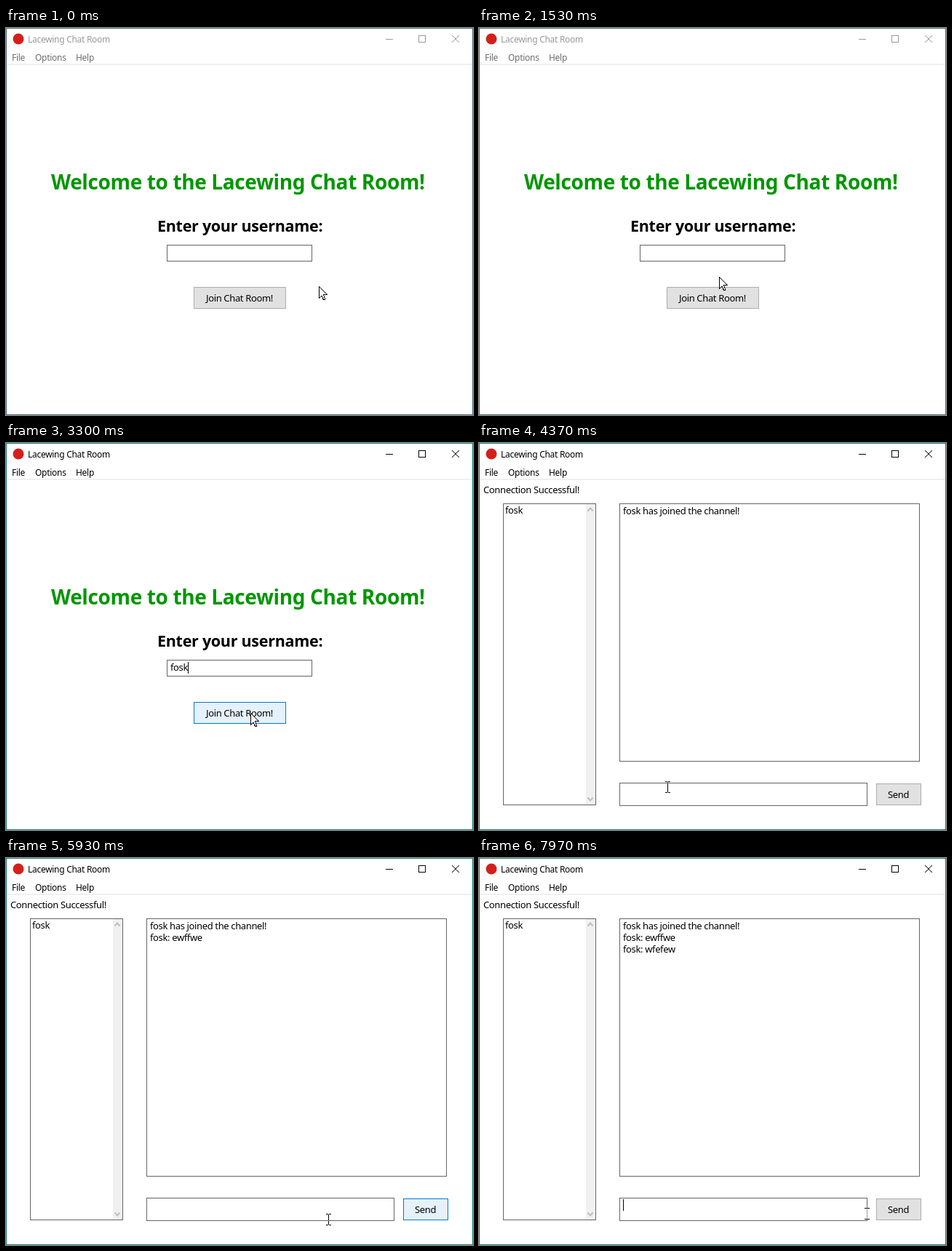
An HTML page that plays this animation: 642x532 px, repeating every 8000 ms.

```html
<!DOCTYPE html>
<html lang="en">
<head>
<meta charset="utf-8">
<title>Chat room</title>
<style>
html, body { margin: 0; width: 100%; height: 100%; overflow: hidden; background: #fff; }
svg { display: block; width: 642px; height: 532px; }
text { font: 13px "Noto Sans", "Open Sans", sans-serif; letter-spacing: -.028em; white-space: pre; }
.bar text { font-size: 12px; letter-spacing: -.024em; }
.title, .label { font-weight: 700; letter-spacing: -.013em; }
.title { font-size: 28px; fill: #009600; }
.label { font-size: 21.5px; }
.box { fill: #fff; stroke: #646464; }
.line { fill: none; }
#beam { mix-blend-mode: difference; }
</style>
</head>
<body>
<svg viewBox="0 0 642 532" shape-rendering="crispEdges">
  <rect width="642" height="532" fill="#fff"/>
  <rect y="49" width="642" height="2" fill="#f0f0f0"/>
  <circle cx="17" cy="15" r="7.5" fill="#d4201a" shape-rendering="auto"/>
  <g class="bar">
    <text id="caption" x="30" y="20">Lacewing Chat Room</text>
    <g id="menu">
      <text x="8" y="45">File</text>
      <text x="40" y="45">Options</text>
      <text x="96" y="45">Help</text>
    </g>
  </g>
  <g id="controls" class="line">
    <path d="M522 15.5h10M567.5 10.5h9v9h-9z"/>
    <path d="M613 10l10 10M623 10l-10 10" shape-rendering="auto"/>
  </g>

  <g id="login">
    <text class="title" x="62" y="222">Welcome to the Lacewing Chat Room!</text>
    <text class="label" x="208" y="280">Enter your username:</text>
    <rect class="box" x="221.5" y="298.5" width="199" height="22"/>
    <text id="nameText" x="226" y="313"></text>
    <rect id="joinBtn" x="258.5" y="356.5" width="126" height="29"/>
    <text x="275" y="376">Join Chat Room!</text>
  </g>

  <g id="chat">
    <text x="6" y="69">Connection Successful!</text>
    <rect class="box" x="33.5" y="83.5" width="127" height="414"/>
    <rect x="147" y="84" width="13" height="413" fill="#f0f0f0"/>
    <path class="line" stroke="#bfbfbf" stroke-width="2" shape-rendering="auto"
      d="M149.5 93.5l3.5-4 3.5 4M149.5 487.5l3.5 4 3.5-4"/>
    <text id="member" x="36" y="97"></text>
    <rect class="box" x="193.5" y="83.5" width="412" height="354"/>
    <text id="log0" x="198" y="98"></text>
    <text id="log1" x="198" y="114"></text>
    <text id="log2" x="198" y="130"></text>
    <rect class="box" x="193.5" y="467.5" width="340" height="31"/>
    <text id="draft" x="198" y="482"></text>
    <rect id="sendBtn" x="546.5" y="468.5" width="61" height="29"/>
    <text x="562" y="488">Send</text>
  </g>

  <rect id="caret" width="1" height="16"/>
  <path id="frame" class="line" d="M.5 .5h641v531h-641z"/>
  <path id="arrow" fill="#fff" stroke="#000"
    d="M.5 .5V16.5L4 13 6.5 18.5H8L8.5 17 6.5 11.5H11.5Z"/>
  <path id="beam" fill="#fff" d="M-3-8h3v1h1v-1h3v1h-3v14h3v1h-3v-1h-1v1h-3v-1h3v-14h-3z"/>
</svg>
<script>
const LOOP = 8000, USER = 'fosk', BLINK = 530, KEY = 33, FADE = 90;
const $ = id => document.getElementById(id);

// each visit to a text field: click, type, press the button, text leaves
const visits = [
  { focus: 1600, type: 2970, word: USER, press: 3330, send: 3770 },
  { focus: 4600, type: 4830, word: 'ewffwe', press: 5430, send: 5540 },
  { focus: 5950, type: 6230, word: 'wfefew', press: 6700, send: 6800 },
  { focus: 7130, type: 7450, word: '', press: LOOP, send: LOOP }
];

// pointer moves: start, end, x, y
const moves = [
  [0, 0, 430, 355], [230, 560, 405, 47], [560, 1000, 340, 375],
  [1070, 1530, 330, 342], [1530, 1600, 338, 308], [2270, 2800, 338, 384],
  [3270, 3300, 336, 371], [3770, 4370, 259, 473], [4370, 4670, 319, 489],
  [5050, 5400, 585, 485], [5670, 5930, 443, 497], [6430, 6680, 577, 485],
  [6900, 7000, 533, 489], [7400, 7670, 8, 46], [7670, 7940, 533, 489]
];

const fills = [[225, 225, 225], [229, 241, 251], [204, 228, 247]];
const edges = [[173, 173, 173], [0, 120, 215], [0, 84, 153]];

const ease = k => k * k * (3 - 2 * k);
const mix = (a, b, k) => a.map((v, i) => v + (b[i] - v) * k);
const show = (el, on) => el.setAttribute('visibility', on ? 'visible' : 'hidden');
const lastIndex = (list, test) => list.reduce((n, v, i) => test(v) ? i : n, -1);
const inChat = t => t >= visits[0].send;

function pointer(t) {
  const i = lastIndex(moves, m => m[0] <= t);
  const [start, end, ...to] = moves[i];
  if (t >= end) return to;
  return mix(moves[i - 1].slice(2), to, ease((t - start) / (end - start)));
}

function over(id, [x, y]) {
  const b = $(id), [l, t, w, h] = ['x', 'y', 'width', 'height'].map(k => +b.getAttribute(k));
  return x >= l && x <= l + w && y >= t && y <= t + h;
}

// 0 at rest, 1 hovered or holding the focus, 2 pressed
function buttonState(id, t) {
  const v = visits[lastIndex(visits, v => v.focus <= t)];
  const mine = v && (v === visits[0]) === (id === 'joinBtn');
  if (mine && t >= v.press) return t < v.send ? 2 : 1;
  return over(id, pointer(t)) ? 1 : 0;
}

function paint(id, t) {
  const n = 6;
  let level = 0;
  for (let i = 0; i < n; i++) level += buttonState(id, Math.max(0, t - i * FADE / n)) / n;
  const i = Math.min(1, Math.floor(level));
  const shade = set => `rgb(${mix(set[i], set[i + 1], level - i).map(Math.round)})`;
  $(id).setAttribute('fill', shade(fills));
  $(id).setAttribute('stroke', shade(edges));
}

function typed(v, t) {
  if (!v || t >= v.send) return '';
  return v.word.slice(0, Math.max(0, Math.floor((t - v.type) / KEY) + 1));
}

function drawField(v, t) {
  const chat = inChat(t), field = $(chat ? 'draft' : 'nameText');
  const text = typed(v, t);
  if (field.textContent !== text) field.textContent = text;
  const width = text ? field.getComputedTextLength() : 0;
  const caret = $('caret');
  caret.setAttribute('x', Math.round(+field.getAttribute('x') + width));
  caret.setAttribute('y', chat ? 469 : 301);
  const idle = v ? t - (t >= v.type ? v.type : v.focus) : 0;
  show(caret, v && t < v.press && idle % (2 * BLINK) < BLINK);
}

function drawPointer(v, t) {
  const [x, y] = pointer(t).map(Math.round);
  const move = moves[lastIndex(moves, m => m[0] <= t)];
  // typing hides the pointer until it moves again
  const hidden = v && v.word && t >= v.type && move[0] < v.type;
  const fields = [...$(inChat(t) ? 'chat' : 'login').querySelectorAll('.box')];
  const overText = fields.some(f => f.getAttribute('x') > 100 && within(f, x, y));
  for (const id of ['arrow', 'beam']) {
    $(id).setAttribute('transform', `translate(${x} ${y})`);
    show($(id), !hidden && overText === (id === 'beam'));
  }
}

function within(el, x, y) {
  const b = el.getBBox();
  return x >= b.x - 1 && x <= b.x + b.width + 1 && y >= b.y - 1 && y <= b.y + b.height + 1;
}

function render(t) {
  const v = visits[lastIndex(visits, v => v.focus <= t)];
  const ink = dim => v ? '#000' : dim;
  $('caption').setAttribute('fill', ink('#999'));
  $('menu').setAttribute('fill', ink('#6d6d6d'));
  $('controls').setAttribute('stroke', ink('#999'));
  $('frame').setAttribute('stroke', v ? '#16807e' : '#54707c');
  $('login').style.display = inChat(t) ? 'none' : '';
  $('chat').style.display = inChat(t) ? '' : 'none';
  for (let i = 0; i < 3; i++) show($('log' + i), t >= visits[i].send);
  paint(inChat(t) ? 'sendBtn' : 'joinBtn', t);
  drawField(v, t);
  drawPointer(v, t);
}

$('member').textContent = USER;
$('log0').textContent = USER + ' has joined the channel!';
for (const i of [1, 2]) $('log' + i).textContent = `${USER}: ${visits[i].word}`;

function tick() {
  render(performance.now() % LOOP);
  requestAnimationFrame(tick);
}
tick();
</script>
</body>
</html>
```
